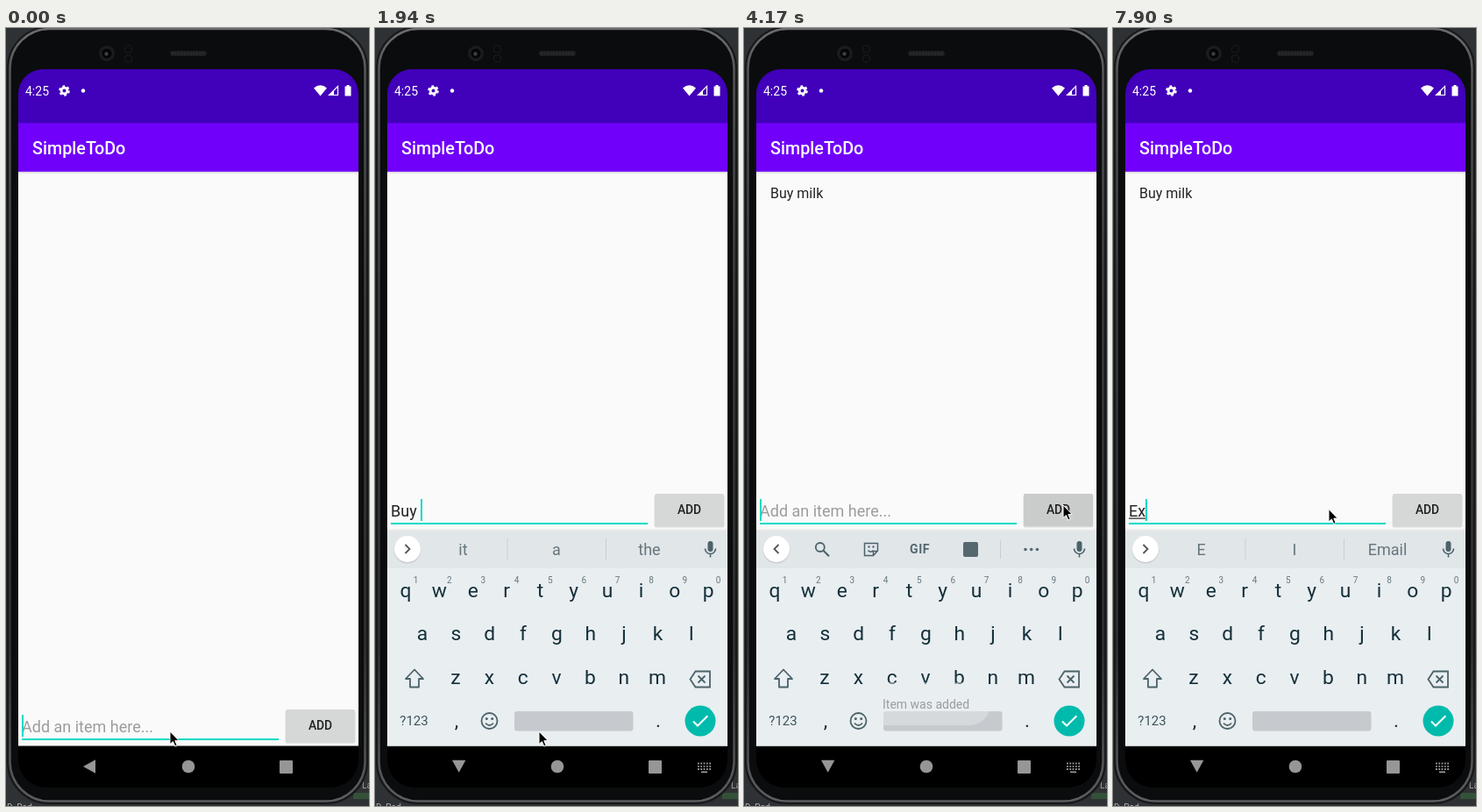
An HTML page for the animation above (8 s loop, 414 by 887 pixels).

```html
<!DOCTYPE html>
<html lang="en">
<head>
<meta charset="utf-8">
<title>To-do app</title>
<style>
html, body { margin: 0; width: 100%; height: 100%; overflow: hidden; background: #2f3234; }
svg { display: block; font-family: Roboto, sans-serif; }
text { white-space: pre; }
.mid { text-anchor: middle; }
.line { fill: none; stroke: #4c626a; stroke-width: 1.8; }
</style>
</head>
<body>
<svg width="414" height="887" viewBox="0 0 414 887">
  <defs>
    <linearGradient id="edge" x2="0" y2="1">
      <stop offset="0" stop-color="#6c6d6f"/><stop offset=".06" stop-color="#525355"/>
      <stop offset=".35" stop-color="#3a3b3c"/><stop offset=".8" stop-color="#303132"/>
      <stop offset="1" stop-color="#5c5d5f"/>
    </linearGradient>
    <linearGradient id="shade" x2="0" y2="1">
      <stop offset="0" stop-color="#000" stop-opacity=".14"/><stop offset="1" stop-color="#000" stop-opacity="0"/>
    </linearGradient>
  </defs>

  <!-- phone body -->
  <rect x="396" y="872" width="18" height="7" fill="#34523a"/>
  <text x="406" y="867" font-size="10" fill="#a0a2a3">La</text>
  <text x="1" y="892" font-size="10" fill="#b0b2b3">D. Pod</text>
  <rect x="2" y="-1" width="410" height="885" rx="47" fill="#0b0c0d" stroke="#17181a" stroke-width="2"/>
  <rect x="4.500" y="1" width="405" height="880.500" rx="45" fill="none" stroke="url(#edge)" stroke-width="2.600"/>
  <circle cx="115" cy="29" r="9" fill="#1b1c1d"/>
  <circle cx="115" cy="29" r="5.500" fill="#050506"/>
  <circle cx="114.500" cy="29.500" r="2.200" fill="#3b3e42"/>
  <g fill="#0b0c0d" stroke="#1b1c1d"><rect x="135.500" y="20" width="8" height="8" rx="3"/><rect x="135.500" y="31" width="8" height="8" rx="3"/></g>
  <rect x="187" y="26" width="42" height="6" rx="3" fill="#1d1e1f"/>
  <path d="M189 29H228" stroke="#2a2b2c" stroke-width="3" stroke-dasharray="2 1.500"/>

  <!-- screen -->
  <rect x="14" y="160" width="388" height="659" fill="#fafafa"/>
  <path d="M14 109V75a28 28 0 0 1 28-28H374a28 28 0 0 1 28 28V109Z" fill="#4100b9"/>
  <rect x="14" y="108.400" width="388" height="55.400" fill="#7000fa"/>
  <rect x="14" y="163.800" width="388" height="3" fill="url(#shade)"/>
  <g fill="#fff">
    <text x="22" y="77" font-size="14">4:25</text>
    <circle cx="66.500" cy="71.500" r="3.400" fill="none" stroke="#fff" stroke-width="2.800"/>
    <circle cx="66.500" cy="71.500" r="5.300" fill="none" stroke="#fff" stroke-width="2" stroke-dasharray="2.800 2.750"/>
    <circle cx="88" cy="71.500" r="2.200"/>
    <path d="M351 68.500Q358.500 62 366 68.500L358.500 77.500Z"/>
    <path d="M378.500 66.500V76.500H368.500Z" fill="none" stroke="#fff" stroke-width="1.200"/>
    <path d="M374 71V77H368Z"/>
    <path d="M386.500 66.500H388.500V65H391.500V66.500H393.500V77.500H386.500Z"/>
    <text x="30" y="144" font-size="19.760" font-weight="500">SimpleToDo</text>
  </g>
  <text id="item" x="30" y="194" font-size="16" fill="#222">Buy milk</text>

  <!-- input row -->
  <g id="row">
    <text id="input" x="18" y="557" font-size="18"></text>
    <rect id="under" y="558.500" height="1.200" fill="#222"/>
    <rect x="18" y="564" width="293" height="2" fill="#03dac5"/>
    <rect id="caret" y="537" width="2" height="25" fill="#03dac5"/>
    <rect x="318.500" y="532" width="80" height="37.500" rx="2.500" fill="#000" opacity=".13"/>
    <rect id="button" x="319" y="531" width="79" height="37" rx="2"/>
    <text class="mid" x="358.500" y="554" font-size="13.800" font-weight="500" fill="#1f1f1f">ADD</text>
  </g>

  <!-- navigation bar -->
  <path d="M14 818.600H402V834a32 32 0 0 1-32 32H46a32 32 0 0 1-32-32Z" fill="#000"/>
  <g fill="#969696">
    <path id="back" d="M88 842L102 834.300V849.700Z"/>
    <circle cx="208" cy="842" r="7.300"/>
    <rect x="312" y="835" width="15" height="15" rx="1"/>
    <g id="switch" stroke="#969696" stroke-width="1.800" stroke-dasharray="1.800 1.500">
      <path d="M368 838.500H383M368 841.800H383M368 845H383"/><path d="M372 848.300H379" stroke-dasharray="none"/>
    </g>
  </g>

  <g id="keyboard">
    <rect x="14" y="571" width="388" height="2" fill="#000" opacity=".05"/>
    <rect x="14" y="573" width="388" height="245.600" fill="#e9eef1"/>
    <rect x="14" y="573" width="388" height="43" fill="#e1e6e9"/>
    <circle cx="37" cy="595" r="15.500" fill="#000" opacity=".1"/>
    <circle cx="37" cy="594" r="15" fill="#fff"/>
    <path id="chevron" class="line" d="M34.500 589L39.500 594L34.500 599" style="stroke:#505558"/>
    <g fill="#4c626a">
      <rect x="379.500" y="585" width="6" height="12" rx="3"/>
      <path class="line" d="M376.500 593.500a6 6 0 0 0 12 0M382.500 599.500V603.500" style="stroke-width:1.600"/>
    </g>
    <g id="words" font-size="18" fill="#66767d">
      <path d="M151 582V606M263.500 582V606" stroke="#c8ced1"/>
      <text class="mid" x="100.500" y="601"></text>
      <text class="mid" x="207" y="601"></text>
      <text class="mid" x="313" y="601"></text>
      <g id="glass"><path d="M201.500 585.500H212.500L211 605H203Z" fill="#f1f3f4" stroke="#d9dee0"/><path d="M203 590H211L210 603.500H204Z" fill="#fff"/></g>
    </g>
    <g id="tools" fill="#55686f">
      <circle class="line" cx="86.800" cy="592" r="5"/><path class="line" d="M90.500 595.700L97 602.200" style="stroke-width:2.200"/>
      <path class="line" d="M137.500 587.500H152.500V596L147.500 601.500H137.500ZM147.500 601.500V596.500H152.500M141.500 595.500q3 3.500 6 0" style="stroke-width:1.500"/>
      <circle cx="142.500" cy="591.500" r="1.200"/><circle cx="147.500" cy="591.500" r="1.200"/>
      <text class="mid" x="200.500" y="599" font-size="14" font-weight="700" letter-spacing=".5">GIF</text>
      <rect x="250" y="586" width="17" height="17" rx="2"/>
      <path d="M292.500 584V605" stroke="#c8ced1"/>
      <circle cx="321" cy="594.500" r="1.800"/><circle cx="327.700" cy="594.500" r="1.800"/><circle cx="334.400" cy="594.500" r="1.800"/>
    </g>
    <g id="keys" fill="#14303a" font-size="22.800"></g>
    <g class="line">
      <path d="M45 731.500L55 742H50V751.500H40V742H35Z" stroke-linejoin="round"/>
      <path d="M365.500 733.500H382V751.500H365.500L359.500 742.500ZM368.500 738.500L376.500 746.500M376.500 738.500L368.500 746.500"/>
      <circle cx="130.500" cy="790" r="9"/><path d="M126 792.500q4.500 5 9 0"/>
    </g>
    <circle cx="127.300" cy="787.500" r="1.500" fill="#4c626a"/><circle cx="133.700" cy="787.500" r="1.500" fill="#4c626a"/>
    <text class="mid" x="44.500" y="795" font-size="15" fill="#3d545d">?123</text>
    <rect x="159" y="779" width="135.500" height="22.500" rx="3" fill="#c6cace"/>
    <circle cx="371" cy="790" r="17.500" fill="#00bbac"/>
    <path d="M363 790.500L368 795.500L379.300 784.300" fill="none" stroke="#fff" stroke-width="2"/>
  </g>

  <g id="toast">
    <rect x="134" y="746" width="147" height="49" rx="24" fill="#ebeef0"/>
    <text x="158" y="776" font-size="14" fill="#303233">Item was added</text>
  </g>
  <path id="mouse" d="M0 0V14.500L3.400 11.500L5.800 17L8.200 16L5.800 10.600H10.300Z" fill="#000" stroke="#fff"/>
</svg>
<script>
const $ = id => document.getElementById(id);
const show = (id, on) => $(id).style.display = on ? '' : 'none';
const clamp = v => Math.max(0, Math.min(1, v));
const smooth = v => (v = clamp(v)) * v * (3 - 2 * v);
const HINT = 'Add an item here...';
const CLEARED = 4000;

// Screen refresh times: the picture holds still between them.
const ticks = [0, 600, 890, 1040, 1190, 1490, 1940, 2230, 2530, 2680, 2830,
  3280, 3430, 3580, 3730, 3880, 4020, 4170, 4320, 4470, 4620, 4770, 5070, 5520,
  6110, 6260, 6410, 6560, 7010, 7600, 7750, 7900];

// Input events: time, text, suggestions (none: tool row)
const events = [
  [0, ''],
  [890, 'B', 'B,Be,But'],
  [1150, 'Bu', 'Bu,But,Buy'],
  [1450, 'Buy', 'Buy,But,Buying'],
  [1900, 'Buy ', 'it,a,the'],
  [2200, 'Buy m', 'm,my,me'],
  [2500, 'Buy mi', 'mi,my,mix'],
  [2640, 'Buy mil', 'mil,milk,mile'],
  [2770, 'Buy milk', 'milk,,Olvo'],
  [CLEARED, ''],
  [7560, 'E'],
  [7700, 'E', 'E,I,Email'],
  [7850, 'Ex', 'E,I,Email']
];

function label(x, y, s, extra = '') {
  $('keys').insertAdjacentHTML('beforeend', `<text class="mid" x="${x}" y="${y}" ${extra}>${s}</text>`);
}
[['qwertyuiop', 35, 649], ['asdfghjkl', 54, 698], ['zxcvbnm', 92, 748]].forEach(([row, x, y]) =>
  [...row].forEach((c, i) => label(x + 38.35 * i, y, c)));
[...'1234567890'].forEach((c, i) => label(46.5 + 38.35 * i, 633, c, 'font-size="10" fill="#66787f"'));
label(93, 797, ',');
label(323, 797, '.');

function mouseAt(t) {
  const u = smooth((t - 3180) / 680), v = smooth((t - 4200) / 430);
  const curve = (a, b, c) => a * (1 - u) ** 2 + 2 * b * u * (1 - u) + c * u * u;
  return [curve(187, 205, 364) - 118 * v, curve(802, 640, 544) + 4.5 * v];
}

function draw(now) {
  const t = ticks.filter(k => k <= now).pop();
  const [since, value, hints] = events.filter(e => e[0] <= t).pop();
  const open = t >= 890;
  const late = open ? clamp((1190 - t) / 300) : 0;

  // input field
  const input = $('input');
  $('row').setAttribute('transform', `translate(0 ${open ? 0 : 246})`);
  input.textContent = value || HINT;
  input.setAttribute('fill', value ? '#222' : '#9c9c9c');
  const width = n => n ? input.getSubStringLength(0, n) : 0;
  const start = width(value.lastIndexOf(' ') + 1), end = width(value.length);
  $('under').setAttribute('x', 18 + start);
  $('under').setAttribute('width', Math.max(0, end - start));
  $('caret').setAttribute('x', 18 + Math.round(end));
  show('under', value && !value.endsWith(' '));
  show('caret', Math.floor((t - since) / 500) % 2 === 0);
  $('button').setAttribute('fill', t >= 3880 && t < 4320 ? '#cacbcb' : '#d6d7d7');
  show('item', t >= CLEARED);

  // keyboard and navigation
  show('keyboard', open);
  show('switch', open);
  $('keyboard').setAttribute('transform', `translate(0 ${15.5 * late * late})`);
  $('keyboard').setAttribute('opacity', 1 - 0.22 * late);
  $('switch').setAttribute('opacity', 1 - 0.3 * late);
  $('back').setAttribute('transform', open ? `rotate(${25 * late - 90} 95.2 841.5)` : '');
  $('chevron').setAttribute('transform', hints ? '' : 'rotate(180 37 594)');
  show('words', hints);
  show('tools', !hints);
  if (hints) {
    const list = hints.split(',');
    $('words').querySelectorAll('text').forEach((el, i) => el.textContent = list[i]);
    show('glass', !list[1]);
  }

  const fade = Math.min(clamp((t - 4020) / 350), clamp((6510 - t) / 450));
  $('toast').setAttribute('opacity', fade);
  $('mouse').setAttribute('transform', `translate(${mouseAt(t)})`);
}

function frame() {
  draw(performance.now() % 8000);
  requestAnimationFrame(frame);
}
frame();
</script>
</body>
</html>
```
